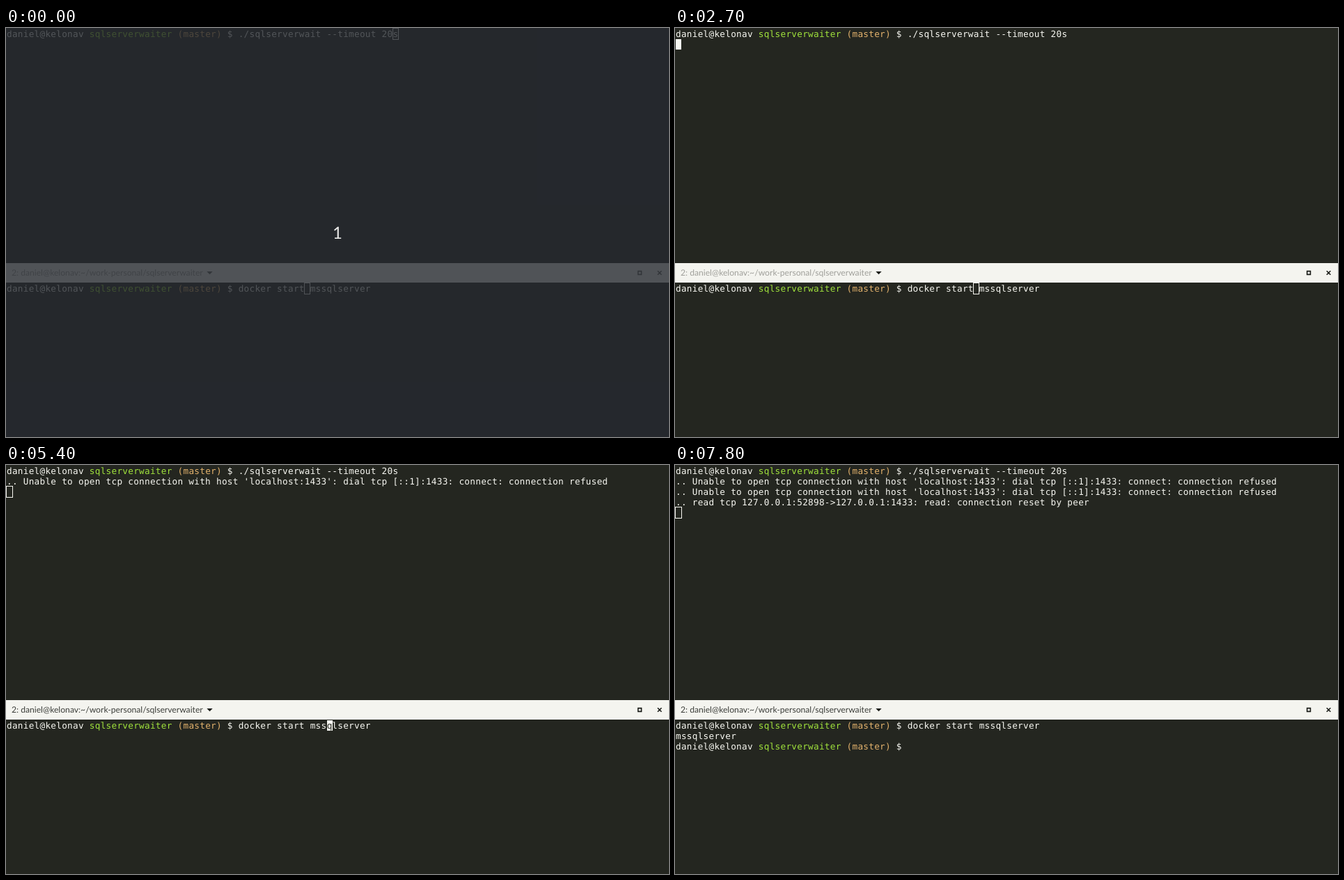
Animation, 952 px wide and 588 px high, one loop 8 s. Source, as an HTML page:

```html
<!DOCTYPE html>
<html lang="en">
<head>
<meta charset="utf-8">
<title>Split terminal</title>
<style>
  html, body { margin: 0; width: 100%; height: 100%; overflow: hidden; background: #242620; }
  #stage { position: relative; width: 952px; height: 588px; overflow: hidden; text-rendering: geometricPrecision; }
  /* The terminal grid cell is slightly wider than the font's own advance. */
  .pane { position: absolute; left: 1px; color: #f8f8f2; white-space: pre; letter-spacing: .291px;
          font: 12.68px/15px "DejaVu Sans Mono", monospace; }
  #top { top: 1px; }
  #bottom { top: 367px; }
  .dir { color: #a0e23c; }
  .branch { color: #e3b26c; }
  .cursor { position: absolute; box-sizing: border-box; }
  .solid { width: 8px; height: 15px; background: #f8f8f2; color: #242620; }
  .hollow { width: 9.5px; height: 17px; margin: -1px; border: 1px solid #f8f8f2; }
  #bar { position: absolute; left: 0; top: 338px; background: #f4f4ef; }
  #title { font: 12.15px Lato, sans-serif; }
  #veil { position: absolute; inset: 0; background: rgba(37, 41, 48, .79); }
  #count { position: absolute; left: 0; width: 100%; top: 280px; text-align: center;
           color: #e9e9e7; font: 24px/29px Lato, sans-serif; }
</style>
</head>
<body>
<div id="stage">
  <div id="top" class="pane"></div>
  <svg id="bar" width="952" height="28">
    <text id="title" x="8" y="18">2: daniel@kelonav:~/work-personal/sqlserverwaiter</text>
    <g id="icons">
      <path d="M288.3 12h8.4l-4.2 4.2z" fill="currentColor"/>
      <path d="M907.6 11.6h4.8v4.8h-4.8zM935.7 11.2l5.6 5.6m0-5.6l-5.6 5.6" fill="none" stroke="currentColor" stroke-width="1.6"/>
    </g>
  </svg>
  <div id="bottom" class="pane"></div>
  <div id="veil"><div id="count">1</div></div>
</div>
<script>
const LOOP = 8000, CELL = 7.925, ROW = 15;
const $ = id => document.getElementById(id);

const prompt = 'daniel@kelonav <span class="dir">sqlserverwaiter</span> <span class="branch">(master)</span> $ ';
const refused = ".. Unable to open tcp connection with host 'localhost:1433': dial tcp [::1]:1433: connect: connection refused";
const reset = '.. read tcp 127.0.0.1:52898-&gt;127.0.0.1:1433: read: connection reset by peer';
const command = 'docker start mssqlserver';

// Lines as [time shown, html]
const topLines = [[0, prompt + './sqlserverwait --timeout 20s'], [3600, refused], [5600, refused], [7600, reset]];
const bottomLines = [[0, prompt + command], [7700, 'mssqlserver'], [7700, prompt]];

// Cursor states as [time, style, row, column, covered character]
const topCursor = [
  [0, 'hollow', 0, 70], [400, 'solid', 0, 70, 's'], [1100], [1500, 'solid', 0, 70, 's'],
  [1600, 'solid', 1, 0], [2100], [2700, 'solid', 1, 0], [3300],
  [3500, 'hollow', 1, 0], [3600, 'hollow', 2, 0], [5600, 'hollow', 3, 0], [7600, 'hollow', 4, 0]
];
const onCommand = (time, i) => [time, 'solid', 0, 42 + i, command[i]];
const bottomCursor = [
  [0, 'hollow', 0, 54], onCommand(3500, 12), [4100], onCommand(4700, 12), onCommand(4800, 13),
  onCommand(5400, 16), onCommand(5500, 19), onCommand(5600, 22), onCommand(5700, 24), [6300],
  onCommand(7000, 24), [7200, 'solid', 1, 0], [7700, 'solid', 2, 42], [7800]
];

const titleColors = [[0, '#a0a09b'], [3500, '#6e6e6a'], [3600, '#3c3e3a']];
const iconColors = [[0, '#666762'], [400, '#3e403b'], [500, '#1b1d19']];

const latest = (states, t) => states.filter(s => s[0] <= t).pop();

function drawPane(pane, lines, cursors, t) {
  const [, style, row, col, char = ''] = latest(cursors, t);
  const text = lines.filter(l => l[0] <= t).map(l => l[1]).join('\n');
  const cursor = style
    ? `<span class="cursor ${style}" style="left:${col * CELL}px;top:${row * ROW}px">${char}</span>`
    : '';
  pane.innerHTML = text + cursor;
}

let shown = -1;
function frame() {
  const t = Math.floor(performance.now() % LOOP / 100) * 100;
  if (t !== shown) {
    shown = t;
    drawPane($('top'), topLines, topCursor, t);
    drawPane($('bottom'), bottomLines, bottomCursor, t);
    $('title').style.fill = latest(titleColors, t)[1];
    $('icons').style.color = latest(iconColors, t)[1];
    $('veil').style.display = t < 100 ? 'block' : 'none';
  }
  requestAnimationFrame(frame);
}
frame();
</script>
</body>
</html>
```
